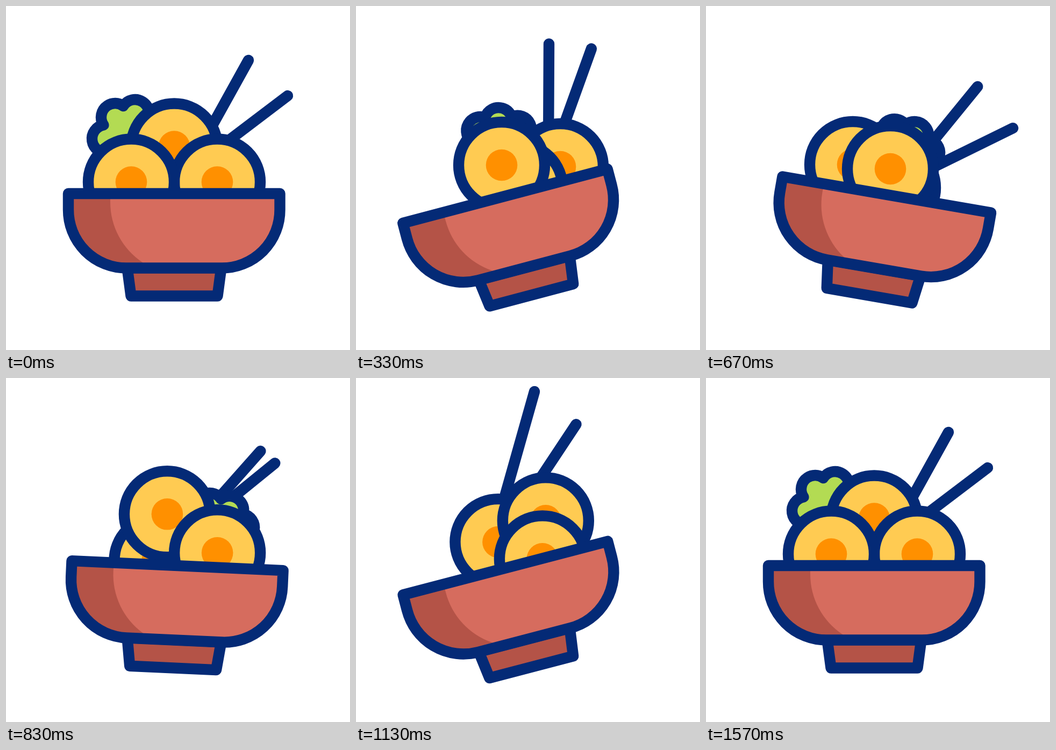
These frames come from a looping animation (640x640 px, 2000 ms). An HTML page with a canvas:

```html
<!DOCTYPE html>
<html lang="en">
<head>
<meta charset="utf-8">
<title>Noodle bowl</title>
<style>
  html, body { margin: 0; width: 100%; height: 100%; overflow: hidden; background: #fff; }
  canvas { display: block; width: 100vmin; height: 100vmin; }
</style>
</head>
<body>
<canvas id="stage" width="640" height="640"></canvas>
<script>
const ctx = document.getElementById('stage').getContext('2d');
const NAVY = '#042a76', YELLOW = '#ffcb52', ORANGE = '#ff9000', GREEN = '#b3db53';
const RED = '#d66c5e', DARK_RED = '#b45347';
const LOOP = 2000, STEP = 100 / 3, LAST = 47;
const PIVOT = { x: 313, y: 487 };
const rad = deg => deg * Math.PI / 180;

// Smooth curve through timed points, at rest at both ends.
const TIMES = [0, 10, 16, 20, 29, 38, LAST];
function track(points, times = TIMES) {
  const end = times.length - 1;
  const slope = (i, c) => i === 0 || i === end ? 0
    : (points[i + 1][c] - points[i - 1][c]) / (times[i + 1] - times[i - 1]);
  return frame => {
    let i = 0;
    while (i < end - 1 && frame >= times[i + 1]) i++;
    const span = times[i + 1] - times[i];
    const u = (frame - times[i]) / span, v = 1 - u;
    return points[i].map((p, c) =>
      v * v * (1 + 2 * u) * p + u * u * (3 - 2 * u) * points[i + 1][c]
      + span * u * v * (v * slope(i, c) - u * slope(i + 1, c)));
  };
}

// Back to front, in stage coordinates.
const eggs = [
  track([[313, 261.5], [380, 299], [393, 330], [347, 338], [247, 333], [290, 282], [313, 261.5]]),
  track([[393, 327.5], [304, 337], [262, 330], [273, 295], [323, 236], [373, 297], [393, 327.5]]),
  track([[233, 327.5], [271, 296], [306, 293], [343, 303], [409, 338.5], [287, 331], [233, 327.5]])
];

// x, y, turn
const lettuce = track([[240, 200, 0], [265, 215, -16], [323, 228, 2], [388, 241, 18],
  [415, 249, 17], [310, 262, 0], [240, 200, 0]]);

// Tip x, y and lean from vertical, relative to the upright bowl.
const sticks = [
  track([[451, 101, 29], [464, 96, 15.1], [462, 106, 21.2], [445, 122, 29.4], [467.5, 122, 44],
    [457, 65, 36], [445, 41, 28], [444, 55, 23.3], [451, 101, 29]],
    [0, 10, 16, 20, 29, 32, 35, 38, LAST]),
  track([[524, 167, 52.8], [538, 125, 34.6], [542, 153, 43.6], [523, 187, 54],
    [469.5, 122, 44], [540, 135, 52.4], [524, 167, 52.8]])
];

const SWINGS = [[0, 0], [10.7, -15], [20.5, 10], [33, -15], [44, 0]];
function bowlAngle(frame) {
  const next = SWINGS.findIndex(([time]) => time > frame);
  if (next < 0) return 0;
  const [t0, a0] = SWINGS[next - 1], [t1, a1] = SWINGS[next];
  const u = (frame - t0) / (t1 - t0);
  return a0 + (a1 - a0) * u * u * (3 - 2 * u);
}

function outlined(path, fill) {
  ctx.fillStyle = fill;
  ctx.fill(path);
  ctx.stroke(path);
}

function disc(x, y, r) {
  const path = new Path2D();
  path.arc(x, y, r, 0, 2 * Math.PI);
  return path;
}

function inBowlFrame(angle, draw) {
  ctx.save();
  ctx.translate(PIVOT.x, PIVOT.y);
  ctx.rotate(rad(angle));
  ctx.translate(-PIVOT.x, -PIVOT.y);
  draw();
  ctx.restore();
}

function drawStick([x, y, lean]) {
  const length = 200;
  ctx.beginPath();
  ctx.moveTo(x, y);
  ctx.lineTo(x - length * Math.sin(rad(lean)), y + length * Math.cos(rad(lean)));
  ctx.stroke();
}

// Each lobe: centre x, y, start and end angle
const LOBES = [[-54, 47, 126, 259.8], [-37, 7, 146.3, 305.5], [0, 0, 212.5, 355.6], [30, 24, 261.3, 450]];
const leaf = new Path2D();
LOBES.forEach(([x, y, from, to]) => leaf.arc(x, y, 26, rad(from), rad(to)));
leaf.lineTo(-5, 90);
leaf.closePath();

function drawLettuce([x, y, turn]) {
  ctx.save();
  ctx.translate(x, y);
  ctx.rotate(rad(turn));
  outlined(leaf, GREEN);
  ctx.restore();
}

function drawEgg([x, y]) {
  outlined(disc(x, y, 80), YELLOW);
  ctx.fillStyle = ORANGE;
  ctx.fill(disc(x, y, 29.3));
}

const foot = new Path2D('M225.5 487L232.5 539.5H393.5L400.5 487Z');
const bowl = new Path2D('M116 349H509.5V379A108 108 0 0 1 401.5 487.5H224A108 108 0 0 1 116 379Z');
const shade = new Path2D('M116 349H194V365A134 134 0 0 0 254 477L262 487.5H224A108 108 0 0 1 116 379Z');

function drawBowl() {
  outlined(foot, DARK_RED);
  ctx.fillStyle = RED;
  ctx.fill(bowl);
  ctx.fillStyle = DARK_RED;
  ctx.fill(shade);
  ctx.stroke(bowl);
}

function frameAt(time) {
  const frame = Math.floor((time + 4) / STEP);
  const start = Math.round(frame * STEP / 10) * 10;
  return Math.min(LAST, start > time ? frame - 1 : frame);
}

function render(now) {
  const frame = frameAt(now % LOOP);
  const angle = bowlAngle(frame);
  ctx.fillStyle = '#fff';
  ctx.fillRect(0, 0, 640, 640);
  ctx.strokeStyle = NAVY;
  ctx.lineWidth = 20.4;
  ctx.lineCap = ctx.lineJoin = 'round';
  inBowlFrame(angle, () => sticks.forEach(stick => drawStick(stick(frame))));
  drawLettuce(lettuce(frame));
  eggs.forEach(egg => drawEgg(egg(frame)));
  inBowlFrame(angle, drawBowl);
}

const began = performance.now();
function tick() {
  render(performance.now() - began);
  requestAnimationFrame(tick);
}
tick();
</script>
</body>
</html>
```
